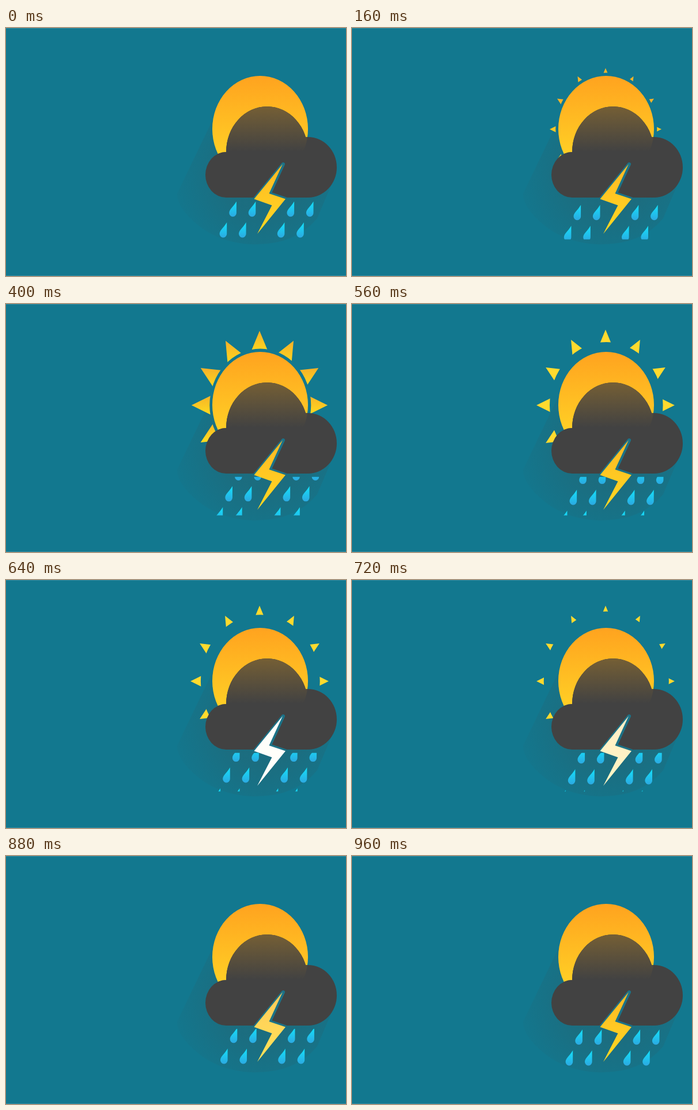
Animation, 590 px wide and 430 px high, one loop 1000 ms. Source, as an HTML page with a canvas:

```html
<!DOCTYPE html>
<html lang="en">
<head>
<meta charset="utf-8">
<title>Stormy weather</title>
<style>
  html, body { margin: 0; width: 100%; height: 100%; overflow: hidden; background: #12788f; }
  canvas { display: block; width: 590px; height: 430px; }
</style>
</head>
<body>
<canvas id="stage" width="590" height="430"></canvas>
<script>
const W = 590, H = 430;
const LOOP = 1000, STEP = 40, CYCLE = 960;
const ctx = document.getElementById('stage').getContext('2d');

const clamp = (v, a = 0, b = 1) => Math.min(b, Math.max(a, v));
const mix = (a, b, k) => `rgb(${a.map((v, i) => Math.round(v + (b[i] - v) * k))})`;

function vertical(y0, y1, c0, c1) {
  const g = ctx.createLinearGradient(0, y0, 0, y1);
  g.addColorStop(0, c0);
  g.addColorStop(1, c1);
  return g;
}

function ellipse(x, y, rx, ry) {
  const p = new Path2D();
  p.ellipse(x, y, rx, ry, 0, 0, Math.PI * 2);
  return p;
}

function polygon(points) {
  const p = new Path2D();
  points.forEach(([x, y]) => p.lineTo(x, y));
  p.closePath();
  return p;
}

const sun = ellipse(441, 175, 83, 92);

const cloud = new Path2D();
cloud.addPath(ellipse(382, 254.5, 36, 39.5));
cloud.addPath(ellipse(524, 241.5, 50, 52.5));
cloud.addPath(ellipse(453, 215, 71, 79));
cloud.rect(382, 214, 142, 80);

const shadow = new Path2D('M360 156 L297 287 Q296 305 318 328 Q360 372 425 375 Q500 378 540 330 L574 250 L440 170 Z');
const bolt = polygon([[480, 236], [430.5, 296.5], [461.5, 307.5], [436, 357], [485, 296.5], [456.5, 287]]);
const drop = new Path2D('M6.3 -20 L6.3 0 A6.3 6.5 0 0 1 -6.3 0 C-6.3 -6 -1 -8.5 6.3 -20 Z');

function drawBackdrop() {
  ctx.fillStyle = '#12788f';
  ctx.fillRect(0, 0, W, H);
  ctx.fillStyle = 'rgba(255,255,255,.15)';
  ctx.fillRect(0, 0, W, 1);
  ctx.fillRect(0, H - 1, W, 1);

  const g = ctx.createRadialGradient(450, 250, 70, 450, 250, 165);
  g.addColorStop(0, 'rgba(66,66,66,.2)');
  g.addColorStop(1, 'rgba(66,66,66,.02)');
  ctx.fillStyle = g;
  ctx.fill(shadow);
}

// Rays slide out from behind a ring, then the ring widens and swallows them.
function drawRays(t) {
  const reach = Math.min(131, 106 + (t - 160) * 0.096);
  const ring = 1 + Math.max(0, t - 400) * 0.00073;
  if (reach < 97 || 98 * ring > 132) return;

  const warm = clamp((t - 400) / 120);
  const top = mix([246, 176, 40], [255, 218, 46], warm);
  const low = mix([255, 222, 30], [255, 218, 46], warm);
  const depth = 42, half = depth * 0.45;

  ctx.save();
  const mask = new Path2D();
  mask.rect(0, 0, W, H);
  mask.addPath(ellipse(441.3, 175.5, 88 * ring, 98 * ring));
  ctx.clip(mask, 'evenodd');

  for (let i = -1; i <= 7; i++) {
    const a = i * Math.PI / 6;
    const c = Math.cos(a), s = Math.sin(a);
    const at = (r, side) => [
      440 - 0.915 * (r * c + side * s),
      175.5 - (r * s - side * c)
    ];
    const pts = [at(reach, 0), at(reach - depth, half), at(reach - depth, -half)];
    const ys = pts.map(p => p[1]);
    ctx.fillStyle = vertical(Math.min(...ys), Math.max(...ys), top, low);
    ctx.fill(polygon(pts));
  }
  ctx.restore();
}

function drawSunAndCloud() {
  ctx.fillStyle = vertical(83, 235, '#ffa31f', '#ffd426');
  ctx.fill(sun);

  ctx.fillStyle = '#424242';
  ctx.fill(cloud);

  ctx.save();
  ctx.clip(cloud);
  ctx.fillStyle = vertical(136, 214, '#755f35', '#424242');
  ctx.fill(sun);
  ctx.translate(1, 0);
  ctx.strokeStyle = '#1c7287';
  ctx.lineWidth = 6;
  ctx.lineJoin = 'round';
  ctx.stroke(bolt);
  ctx.restore();
}

function drawRain(p) {
  ctx.save();
  ctx.beginPath();
  ctx.rect(320, 299.7, 240, 66.8);
  ctx.clip();
  const fill = vertical(-20, 6.5, '#12e2fb', '#2ca9e1');
  for (let row = -1; row < 2; row++) {
    for (const col of [0, 1, 3, 4]) {
      ctx.save();
      ctx.translate(393.6 + col * 33.4 - 16.7 * (row + p), 320.7 + 36.3 * (row + p));
      ctx.fillStyle = fill;
      ctx.fill(drop);
      ctx.restore();
    }
  }
  ctx.restore();
}

function drawBolt(t) {
  const flash = t < 640 ? clamp((t - 560) / 80) : clamp((960 - t) / 320);
  const white = [255, 255, 250];
  ctx.fillStyle = vertical(236, 357, mix([255, 184, 36], white, flash), mix([255, 217, 34], white, flash));
  ctx.fill(bolt);
}

function render(now) {
  const t = Math.floor((now % LOOP) / STEP) * STEP;
  drawBackdrop();
  drawRays(t);
  drawSunAndCloud();
  drawRain(t / CYCLE);
  drawBolt(t);
  requestAnimationFrame(tick);
}

let start;
function tick(now) {
  start ??= now;
  render(now - start);
}
requestAnimationFrame(tick);
</script>
</body>
</html>
```
